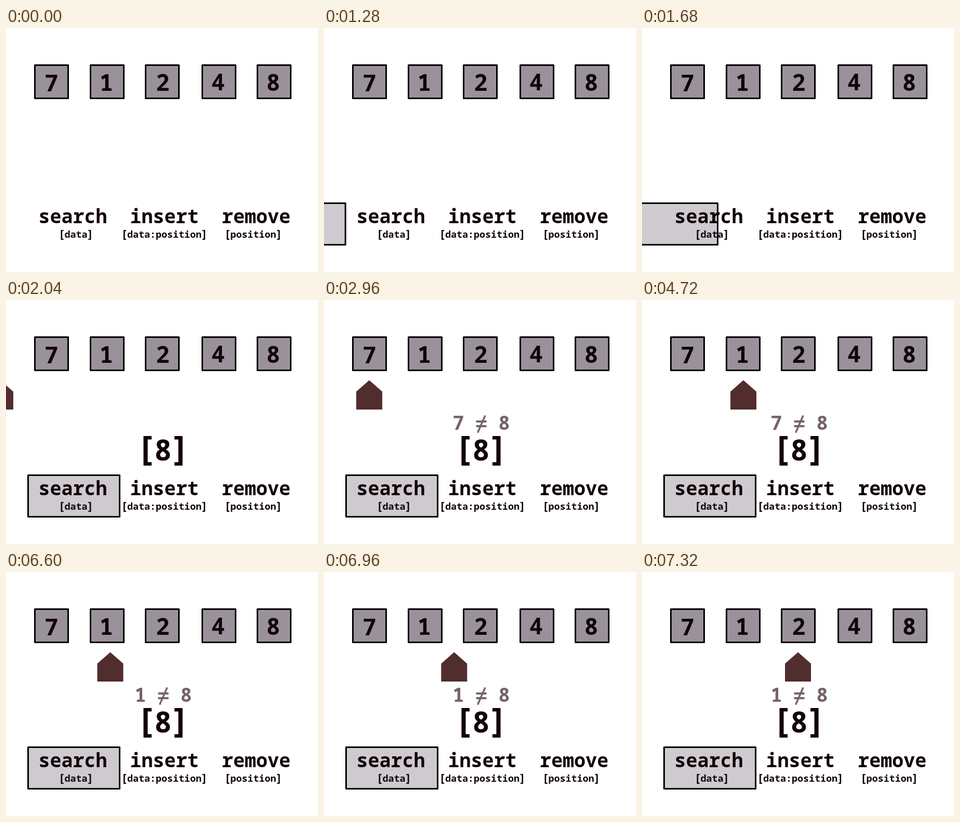
These frames come from a looping animation (600x470 px, 8000 ms). An HTML page with a canvas:

```html
<!DOCTYPE html>
<html lang="en">
<head>
<meta charset="utf-8">
<title>Linear search</title>
<style>
html, body { margin: 0; width: 100%; height: 100%; overflow: hidden; background: #fff; }
canvas { display: block; }
</style>
</head>
<body>
<canvas id="stage" width="600" height="470"></canvas>
<script>
const ctx = document.getElementById('stage').getContext('2d');
const LOOP = 8000, STEP = 40;
const INK = '#120206', CELL = '#9a929a', MARK = '#cecacf', ARROW = '#522d2e', NOTE = '#756469';
const FONT = '"Noto Sans Mono", "DejaVu Sans Mono", monospace';
const ADVANCE = 0.6;

// [digit, box left, digit centre, baseline]
const cells = [
  [7, 54, 87.5, 122],
  [1, 161, 193, 121],
  [2, 267, 301.5, 121],
  [4, 376, 408, 120],
  [8, 482, 514, 121]
];

// [name, centre, arguments, centre]
const commands = [
  ['search', 128.5, '[data]', 134.5],
  ['insert', 304.5, '[data:position]', 304.5],
  ['remove', 481, '[position]', 475.5]
];

function text(str, x, y, size, color = INK) {
  ctx.font = `bold ${size}px ${FONT}`;
  ctx.fillStyle = color;
  ctx.fillText(str, x, y);
}

// Monospaced line whose square brackets are taller than the letters
function bracketed(str, x, y, size) {
  const pitch = size * ADVANCE;
  const first = x - pitch * (str.length - 1) / 2;
  [...str].forEach((ch, i) => {
    text(ch, first + i * pitch, y, /[[\]]/.test(ch) ? size * 1.18 : size);
  });
}

function box(x, y, w, h, fill) {
  ctx.fillStyle = fill;
  ctx.strokeStyle = '#000';
  ctx.lineWidth = 3;
  ctx.lineJoin = 'round';
  ctx.beginPath();
  ctx.rect(x + 1.5, y + 1.5, w - 3, h - 3);
  ctx.fill();
  ctx.stroke();
}

function arrow(x) {
  ctx.fillStyle = ARROW;
  ctx.beginPath();
  ctx.moveTo(x, 211);
  ctx.lineTo(x, 176.5);
  ctx.lineTo(x + 25, 154.5);
  ctx.lineTo(x + 50, 176.5);
  ctx.lineTo(x + 50, 211);
  ctx.fill();
}

function notEqual(x, y) {
  ctx.fillStyle = NOTE;
  ctx.fillRect(x - 9.5, y - 6.5, 20, 4);
  ctx.fillRect(x - 9.5, y + 2.5, 20, 4);
  ctx.strokeStyle = NOTE;
  ctx.lineWidth = 3.5;
  ctx.beginPath();
  ctx.moveTo(x + 8, y - 16);
  ctx.lineTo(x - 6.5, y + 17);
  ctx.stroke();
}

function slide(t, t0, t1, a, b) {
  const p = Math.min(1, Math.max(0, (t - t0) / (t1 - t0)));
  return a + (b - a) * p;
}

function arrowX(t) {
  if (t < 3960) return slide(t, 1960, 2520, -52.3, 62);
  if (t < 6560) return slide(t, 3960, 4720, 62, 170);
  return slide(t, 6560, 7320, 170, 275);
}

function draw(t) {
  ctx.fillStyle = '#fff';
  ctx.fillRect(0, 0, 600, 470);
  ctx.textAlign = 'center';
  ctx.textBaseline = 'alphabetic';

  for (const [digit, left, x, y] of cells) {
    box(left, 70, 67, 67, CELL);
    text(digit, x, y, 44);
  }

  if (t >= 1160) box(slide(t, 1120, 1960, -178, 41), 336, 179, 83, MARK);
  for (const [name, x, args, ax] of commands) {
    text(name, x, 376, 36.67);
    bracketed(args, ax, 404, 18.33);
  }

  if (t >= 1960) bracketed('[8]', 302, 309, 55);
  if (t >= 2000) arrow(arrowX(t));
  if (t >= 2960) {
    text(t < 5560 ? '7' : '1', 258.5, 250, 36.67, NOTE);
    notEqual(302, 238.5);
    text('8', 346.5, 250, 36.67, NOTE);
  }
}

let start = null;
function tick(now) {
  if (start === null) start = now;
  const t = (now - start) % LOOP;
  draw(Math.floor(t / STEP) * STEP);
  requestAnimationFrame(tick);
}
draw(0);
requestAnimationFrame(tick);
</script>
</body>
</html>
```
